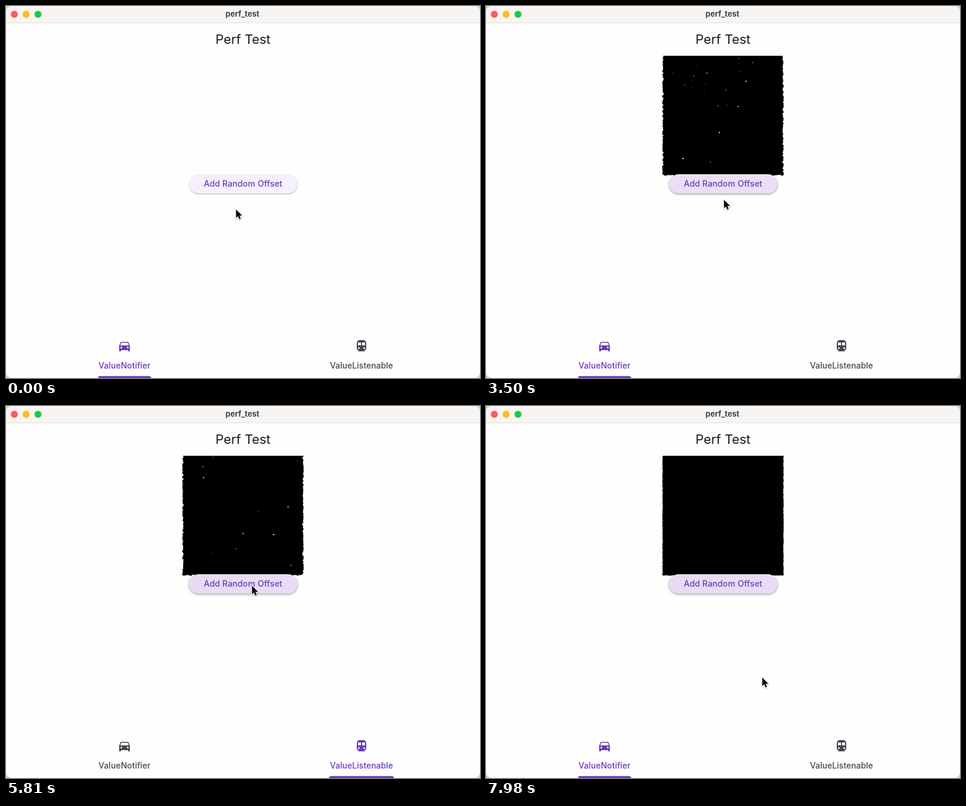
Recreate the animation shown at these times as an HTML page with a canvas. Size 800 by 628 pixels, loop 8000 ms.

```html
<!DOCTYPE html>
<html lang="en">
<head>
<meta charset="utf-8">
<title>perf_test</title>
<style>
html, body { margin: 0; width: 100%; height: 100%; overflow: hidden; }
canvas { display: block; }
</style>
</head>
<body>
<canvas id="stage" width="800" height="628"></canvas>
<script>
const ctx = document.getElementById('stage').getContext('2d');
const LOOP = 8000;
const PRIMARY = [104, 60, 184], MUTED = [73, 69, 79];
const PURPLE = `rgb(${PRIMARY})`;
const TAB_TOP = 554;

// Pointer moves: start, end, destination
const MOVES = [
  [70, 280, 390, 341], [770, 1330, 386, 307], [3430, 3860, 598, 579], [4270, 4640, 427, 314],
  [4640, 4830, 415, 303], [5810, 6200, 231, 591], [6630, 7000, 387, 298], [7490, 7980, 466, 458]
];
const ARROW = new Path2D('M0 0V14.2L3.2 11.2 5.5 16.4 7.9 15.3 5.7 10.3H10.2Z');

const clamp = v => Math.min(1, Math.max(0, v));
const lerp = (a, b, f) => a + (b - a) * f;
const mix = (a, b, f) => `rgb(${a.map((v, i) => Math.round(lerp(v, b[i], f)))})`;
const tint = alpha => `rgba(${PRIMARY}, ${alpha})`;
const pulse = (t, from, to) => clamp((t - from) / 150) - clamp((t - to) / 150);

// cubic-bezier(.25, .1, .25, 1)
function ease(x) {
  if (x <= 0) return 0;
  if (x >= 1) return 1;
  const bez = (a, b, s) => 3 * a * s * (1 - s) ** 2 + 3 * b * s * s * (1 - s) + s ** 3;
  let lo = 0, hi = 1;
  for (let i = 0; i < 20; i++) {
    const mid = (lo + hi) / 2;
    if (bez(.25, .25, mid) < x) lo = mid; else hi = mid;
  }
  return bez(.1, 1, lo);
}

function seeded(seed) {
  return () => (seed = seed * 16807 % 2147483647) / 2147483647;
}

function addCircle(path, x, y, r) {
  path.moveTo(x + r, y);
  path.arc(x, y, r, 0, 7);
}

// Icons live in a 24 px box and are filled with the even-odd rule
function carIcon() {
  const path = new Path2D('M3 12L5.1 6Q5.5 5 6.5 5H17.5Q18.5 5 18.9 6L21 12V21H18V19H6V21H3ZM5 11H19L17.5 6.5H6.5Z');
  for (const x of [6.5, 17.5]) addCircle(path, x, 14.5, 1.5);
  return path;
}

function trainIcon() {
  const path = new Path2D('M7.5 19L6 20.5V21H18V20.5L16.5 19Z');
  path.roundRect(4, 2, 16, 17, [5, 5, 3.5, 3.5]);
  for (const x of [6, 13]) path.rect(x, 6, 5, 5);
  for (const x of [7.5, 16.5]) addCircle(path, x, 15.5, 1.5);
  return path;
}
const CAR = carIcon(), TRAIN = trainIcon();

// A 200 px square of dots: solid inside, bumpy at the edges, with a few gaps
function dotBlock(seed, jitter, gapCount) {
  const rnd = seeded(seed), dots = new Path2D(), gaps = new Path2D();
  const count = 100;
  dots.rect(300, 80, 200, 204);
  for (let i = 0; i < count; i++) {
    const along = (i + rnd()) * 200 / count;
    addCircle(dots, 300 + rnd() * jitter, 84 + along, 2.6);
    addCircle(dots, 500 - rnd() * jitter, 84 + along, 2.6);
    addCircle(dots, 300 + along, 284 - rnd() * jitter, 2.6);
  }
  for (let i = 0; i < gapCount; i++) {
    const x = 304 + rnd() * 192, y = 86 + rnd() * 190, size = .4 + rnd() ** 2 * 1.2;
    gaps.moveTo(x, y);
    gaps.ellipse(x, y, size, size * .55, rnd() * 3, 0, 7);
  }
  return { dots, gaps };
}
const LOOSE = [dotBlock(4711, 2.6, 25), dotBlock(977, 2.6, 14)];
const DENSE = dotBlock(31337, .9, 0);

function text(str, x, y, font, color, spacing = 0) {
  ctx.font = font + ' Inter, "Open Sans", sans-serif';
  ctx.letterSpacing = spacing + 'px';
  ctx.fillStyle = color;
  ctx.fillText(str, x + spacing / 2, y);
}

function rounded(x, y, w, h, r) {
  ctx.beginPath();
  ctx.roundRect(x, y, w, h, r);
}

function pointerAt(t) {
  let x = 388.3, y = 343.5;
  for (const [from, to, toX, toY] of MOVES) {
    const f = clamp((t - from) / (to - from)), s = f * f * (3 - 2 * f);
    x = lerp(x, toX + .3, s);
    y = lerp(y, toY + .5, s);
  }
  return [x, y];
}

// Slow growth while held, then fast growth and a fade after the release
function ripple(t, press, release, from, to, radius) {
  if (t < press || t > release + 375) return;
  const f = ease(Math.min((t - press) / 1000, .07) + Math.max(0, t - release) / 225);
  const alpha = clamp((t - press) / 75) * (1 - clamp((t - release - 225) / 150));
  ctx.fillStyle = tint(.11 * alpha);
  ctx.beginPath();
  ctx.arc(lerp(from[0], to[0], f), lerp(from[1], to[1], f), lerp(radius * .3, radius + 5, f), 0, 7);
  ctx.fill();
}

function drawButton(t, hover, clicks) {
  ctx.save();
  ctx.shadowColor = `rgba(0, 0, 0, ${.32 + .06 * hover})`;
  ctx.shadowBlur = 2 + 2 * hover;
  ctx.shadowOffsetY = 1 + .5 * hover;
  rounded(309, 284, 183, 32.5, 16.25);
  ctx.fillStyle = mix([246, 239, 252], [232, 220, 245], hover);
  ctx.fill();
  ctx.restore();
  ctx.save();
  ctx.clip();
  for (const [press, release, x, y] of clicks) ripple(t, press, release, [x, y], [400, 300], 93);
  ctx.restore();
  text('Add Random Offset', 400, 305, '500 14px', PURPLE, .13);
}

function drawPage(t, x, block, hover, clicks) {
  if (Math.abs(x) >= 800) return;
  ctx.save();
  ctx.beginPath();
  ctx.rect(0, 84, 800, TAB_TOP - 84);
  ctx.clip();
  ctx.translate(x, 0);
  if (block) {
    ctx.fillStyle = '#000';
    ctx.fill(block.dots);
    ctx.fillStyle = '#fff';
    ctx.fill(block.gaps);
  }
  drawButton(t, hover, clicks);
  ctx.restore();
}

function drawTab(t, x, label, icon, active, hover, press, release, from) {
  const color = mix(MUTED, PRIMARY, active);
  ctx.save();
  ctx.beginPath();
  ctx.rect(x, TAB_TOP, 400, 74);
  ctx.clip();
  ctx.fillStyle = tint(.08 * hover);
  ctx.fill();
  ripple(t, press, release, from, [x + 200, 591], 203);
  ctx.translate(x + 188, 562);
  ctx.fillStyle = color;
  ctx.fill(icon, 'evenodd');
  ctx.restore();
  text(label, x + 200, 612, '500 14px', color, .05);
}

function drawWindow() {
  ctx.fillStyle = '#fefefe';
  ctx.fillRect(0, 0, 800, 628);
  ctx.fillStyle = '#f8f4f2';
  ctx.fillRect(0, 0, 800, 28);
  ctx.fillStyle = '#e4dfdd';
  ctx.fillRect(0, 28, 800, 1);
  ['#ff5f57', '#febc2e', '#28c840'].forEach((color, i) => {
    ctx.fillStyle = color;
    ctx.beginPath();
    ctx.arc(14 + 20 * i, 14, 6, 0, 7);
    ctx.fill();
  });
  text('perf_test', 399, 18, '700 13px', '#454142');
  text('Perf Test', 400, 64, '400 22px', '#1c1b1f', -.1);
}

function drawPointer(t) {
  ctx.save();
  ctx.translate(...pointerAt(t));
  ctx.shadowColor = 'rgba(0, 0, 0, .3)';
  ctx.shadowBlur = 2;
  ctx.shadowOffsetY = 1;
  ctx.strokeStyle = '#fff';
  ctx.lineWidth = 2;
  ctx.stroke(ARROW);
  ctx.shadowColor = 'transparent';
  ctx.fillStyle = '#000';
  ctx.fill(ARROW);
  ctx.restore();
}

function draw(t) {
  const page = ease((t - 3924.4) / 300) - ease((t - 6287.7) / 300);
  const first = t < 2450 ? null : t < 7280 ? LOOSE[0] : DENSE;
  const second = t < 5110 ? null : LOOSE[1];

  ctx.textAlign = 'center';
  ctx.fillStyle = '#d2d0d0';
  ctx.fillRect(0, 0, 800, 628);
  ctx.save();
  rounded(0, 0, 800, 628, 10);
  ctx.clip();
  drawWindow();

  drawPage(t, -800 * page, first, pulse(t, 1190, 3480) + pulse(t, 6900, LOOP),
    [[2100, 2508, 386, 307], [7120, 7200, 387, 298]]);
  drawPage(t, 800 - 800 * page, second, pulse(t, 4680, 5880), [[4960, 5045, 415, 303]]);

  drawTab(t, 0, 'ValueNotifier', CAR, 1 - page, pulse(t, 6060, 6720), 6190, 6288, [231, 591]);
  drawTab(t, 400, 'ValueListenable', TRAIN, page, pulse(t, 3730, 4340), 3830, 3926, [598, 579]);

  const left = lerp(155.5, 545.5, page), right = lerp(244.7, 654.3, page);
  rounded(left, 624.8, right - left, 3.2, [3, 3, 0, 0]);
  ctx.fillStyle = PURPLE;
  ctx.fill();
  ctx.restore();

  drawPointer(t);
}

const start = performance.now();
function tick() {
  draw((performance.now() - start) % LOOP);
  requestAnimationFrame(tick);
}
tick();
</script>
</body>
</html>
```
